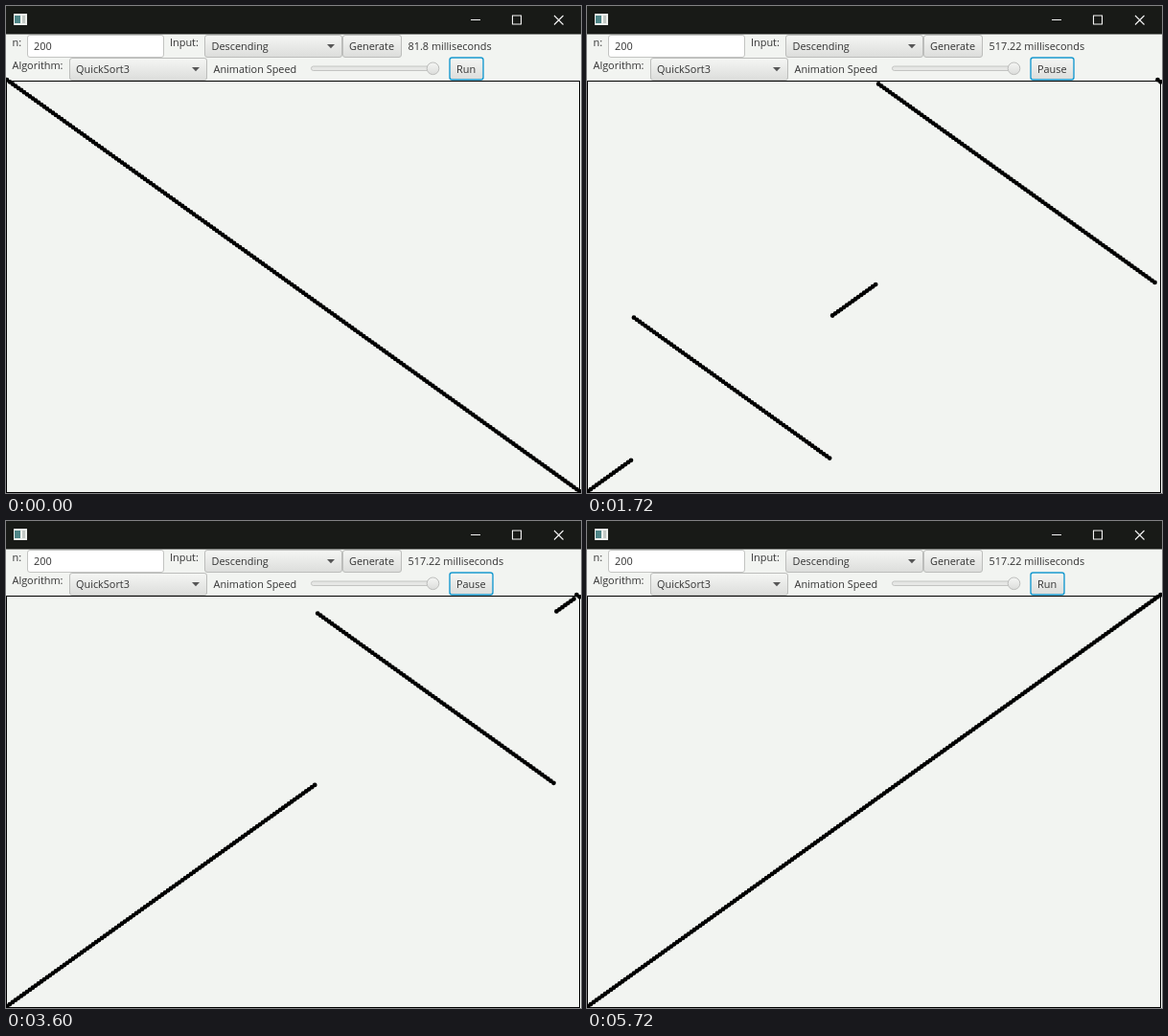
An HTML page with a canvas for the animation above (5760 ms loop, 600 by 509 pixels).

```html
<!DOCTYPE html>
<html lang="en">
<head>
<meta charset="utf-8">
<title>Sort visualiser</title>
<style>
  html, body { margin: 0; width: 600px; height: 509px; overflow: hidden; background: #f2f4f1; }
  svg, canvas { position: absolute; left: 0; top: 0; display: block; }
  text { font: 10.9px "Open Sans", "Noto Sans", sans-serif; fill: #333; white-space: pre; }
  .box { fill: url(#face); stroke: #bcbdbb; }
  .focus { fill: url(#face); stroke: #1a9bd0; stroke-width: 1.4; }
  .arrow { fill: #555; }
  .ctl { fill: none; stroke: #f4f4f4; stroke-width: 1.1; }
</style>
</head>
<body>
<svg width="600" height="509" viewBox="0 0 600 509">
  <defs>
    <linearGradient id="face" x2="0" y2="1">
      <stop offset="0" stop-color="#f5f6f4"/>
      <stop offset="1" stop-color="#dcdddb"/>
    </linearGradient>
  </defs>

  <!-- title bar -->
  <rect width="600" height="29.5" fill="#181a17"/>
  <rect x="8" y="8" width="14" height="12" fill="#eef1ee"/>
  <rect x="9" y="10" width="6" height="8" fill="#4e8587"/>
  <rect x="17" y="10" width="3" height="8" fill="#c3c9c5"/>
  <path class="ctl" d="M485 14.5h10M528.5 10h9v9h-9zM572 10l9.5 9.5M581.5 10l-9.5 9.5"/>

  <!-- first row -->
  <text x="6.5" y="42">n:</text>
  <rect x="22.5" y="30.5" width="142" height="23" rx="2.5" fill="#fff" stroke="#c3c4c2"/>
  <text x="29" y="46">200</text>
  <text x="171" y="42">Input:</text>
  <rect class="box" x="207.5" y="30.5" width="143" height="23" rx="2.5"/>
  <text x="214.5" y="46">Descending</text>
  <path class="arrow" d="M335 40h8l-4 4.2z"/>
  <rect class="box" x="351.5" y="30.5" width="61" height="23" rx="2.5"/>
  <text x="358" y="46">Generate</text>
  <text id="time" x="419.5" y="46"></text>

  <!-- second row -->
  <text x="6.5" y="66">Algorithm:</text>
  <rect class="box" x="66.5" y="54.5" width="143" height="23" rx="2.5"/>
  <text x="73" y="70">QuickSort3</text>
  <path class="arrow" d="M194 64h8l-4 4.2z"/>
  <text x="216.5" y="70">Animation Speed</text>
  <rect x="318.5" y="63" width="130" height="4.5" rx="2.2" fill="#e6e7e5" stroke="#c3c4c2"/>
  <circle class="box" cx="445.5" cy="65.3" r="6.3"/>
  <rect id="btn" class="focus" x="463" y="54" height="23" rx="2.5"/>
  <text id="label" x="470" y="70"></text>

  <rect x=".5" y="78.5" width="598" height="430" fill="none" stroke="#000"/>
</svg>
<canvas id="plot" width="600" height="509"></canvas>

<script>
const N = 200, LOOP = 5760, STEP = 40;
const START = 248, PER_COMPARE = 0.515;  // ms
const RUN_AT = 320;

const $ = id => document.getElementById(id);
const ctx = $("plot").getContext("2d");
const descending = () => Array.from({ length: N }, (_, i) => N - 1 - i);

// Runs the sort once, noting every swap with the number of comparisons before it.
function recordSwaps() {
  const a = descending(), swaps = [];
  let count = 0;

  function swap(i, j) {
    if (i === j) return;
    [a[i], a[j]] = [a[j], a[i]];
    swaps.push({ at: count, i, j });
  }

  function sort(lo, hi) {
    if (lo >= hi) return;
    let i = lo;
    count++;
    for (let j = lo + 1; j <= hi; j++) {
      count++;
      if (a[j] < a[lo]) swap(++i, j);
    }
    swap(lo, i);
    sort(lo, i - 1);
    sort(i + 1, hi);
  }

  swap(0, N / 2 - 1);  // the first pivot is the middle value
  sort(0, N - 1);
  return { swaps, total: count };
}

const { swaps, total } = recordSwaps();

function valuesAt(count) {
  const a = descending();
  for (const { at, i, j } of swaps) {
    if (at > count) break;
    [a[i], a[j]] = [a[j], a[i]];
  }
  return a;
}

function draw(t) {
  const started = t >= RUN_AT;
  const count = started ? (t - START) / PER_COMPARE : -1;
  const running = started && count < total;

  $("time").textContent = (started ? "517.22" : "81.8") + " milliseconds";
  $("label").textContent = running ? "Pause" : "Run";
  $("btn").setAttribute("width", running ? 45 : 35);

  ctx.clearRect(0, 0, 600, 509);
  ctx.fillStyle = "#000";
  ctx.beginPath();
  valuesAt(count).forEach((v, i) => {
    const x = 0.9 + i * 3.003, y = 507.2 - v * 2.161;
    ctx.moveTo(x + 2.4, y);
    ctx.arc(x, y, 2.4, 0, 2 * Math.PI);
  });
  ctx.fill();
}

const origin = performance.now();
let shown = -1;
function tick() {
  const t = Math.floor(((performance.now() - origin) % LOOP) / STEP) * STEP;
  if (t !== shown) draw(shown = t);
  requestAnimationFrame(tick);
}
tick();
</script>
</body>
</html>
```
